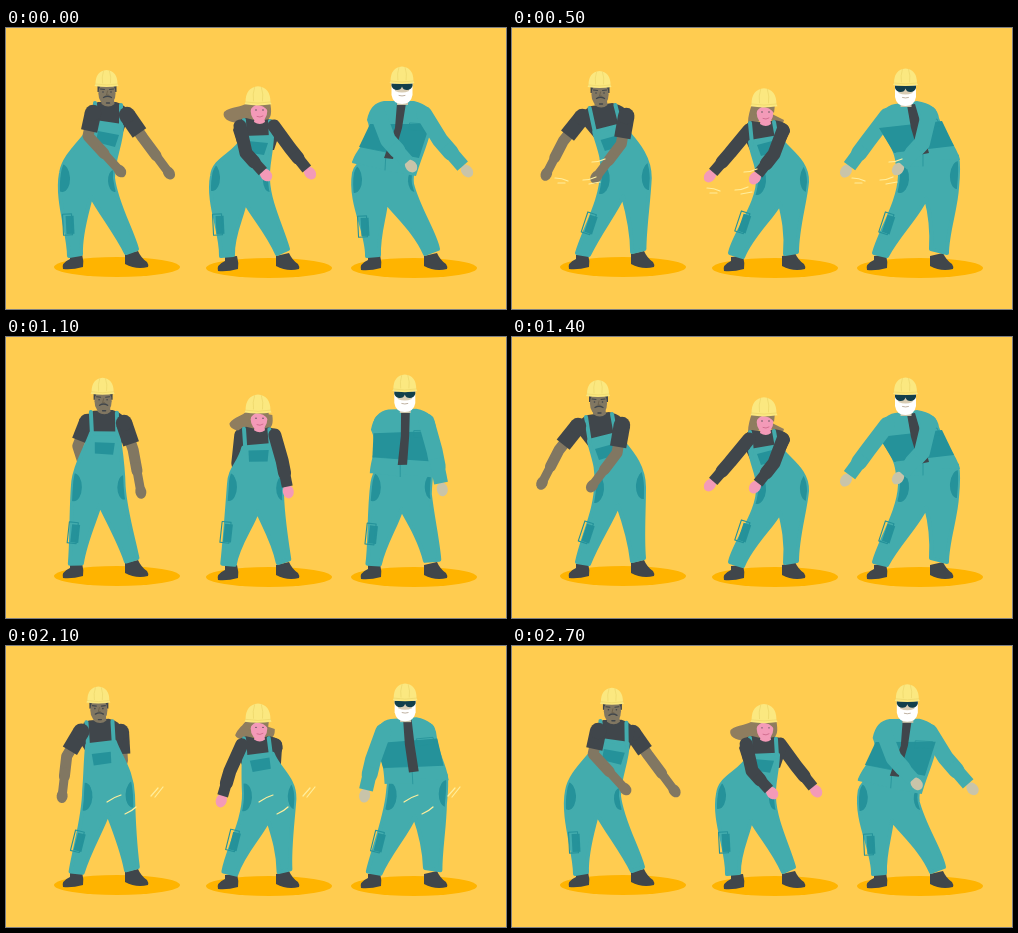
Write an HTML page with a canvas that moves like this. It is 500 by 281 pixels and loops after 2750 ms.

```html
<!DOCTYPE html>
<html lang="en">
<head>
<meta charset="utf-8">
<title>Dancing crew</title>
<style>
  html, body { margin: 0; overflow: hidden; background: #ffcc50; }
  canvas { display: block; width: 100vw; height: 100vh; }
</style>
</head>
<body>
<canvas id="stage" width="500" height="281"></canvas>
<script>
const ctx = document.getElementById('stage').getContext('2d');
const LOOP = 2750, STEP = 50, BEAT = LOOP / 6;
const TEAL = '#43acad', DEEP = '#25929a', DARK = '#40464b', HAT = '#fbe880', STREAK = '#ffee9c';

// Every shape is given twice: arms to the right, then arms to the left.
const crew = [
  {
    look: 'moustache', skin: '#817762', sleeve: DARK, short: true, width: 11, hatSize: 1, sway: 6, drag: 0,
    shadow: [111, 239], shoes: [[56, 226], [118, 225]],
    head: [[100.5, 56], [86, 57]], knee: [[62, 196], [74.5, 195]],
    pockets: [[[56, 150], [84, 152]], [[108, 153], [132, 148]]],
    legs: ['M89,94 L116,98 C115,118 107,130 107,150 C110,175 125,200 131,221 L120,225 C110,205 95,186 85,168 C82,182 74,205 75,226 L63,228 C63,205 50,172 55,145 C58,126 78,112 89,94Z',
           'M77,104 L105,97 C114,110 132,125 132,150 C132,175 130,200 132,221 L120,224 C118,205 112,185 106,168 C100,184 86,204 77,227 L65,225 C70,200 85,172 84,145 C86,130 80,118 77,104Z'],
    under: [[DARK, 'M92,74 L110,74 Q122,77 123,88 L117,104 L87,102 L79,88 Q84,77 92,74Z',
                   'M76,78 L97,75 Q112,78 115,90 L113,114 L77,110 L63,92 Q68,80 76,78Z']],
    over: [[TEAL, 'M89,75 L90,95 M115,77 L115,99', 'M74,80 L78,106 M100,77 L104,99', 4],
           [DEEP, 'M92,103 L113,107 L109,119 L90,114Z', 'M83,112 L101,107 L104,118 L87,123Z']],
    arms: [[[87, 85], [82, 108], [114, 143], [66, 89], [47, 113], [30, 146]],
           [[121, 87], [137, 110], [163, 145], [110, 88], [105, 116], [80, 149]]],
    swoosh: [0, 0]
  },
  {
    look: 'hair', skin: '#f39ab8', sleeve: DARK, width: 13, hatSize: 1.13, sway: 0, drag: 0,
    shadow: [263, 240], shoes: [[211, 228], [269, 227]],
    head: [[252, 74], [252, 76]], knee: [[212, 196], [231, 194]],
    pockets: [[[206, 149], [246, 153]], [[263, 153], [296, 150]]],
    legs: ['M237,110 L266,109 C265,128 261,138 262,152 C263,175 276,200 282,221 L271,226 C262,205 248,190 239,174 C236,190 226,208 227,227 L215,228 C216,205 201,175 206,148 C208,130 229,127 237,110Z',
           'M238,114 L267,109 C274,122 296,132 295,154 C293,175 285,200 285,224 L273,226 C275,205 271,188 268,175 C260,190 240,207 231,229 L218,225 C222,205 248,175 246,148 C245,135 240,128 238,114Z'],
    under: [['#8f7d5f', 'M242,74 C236,80 225,78 218,84 C215,92 228,98 246,93 L258,93 C266,92 266,84 264,74Z',
                        'M240,76 C238,82 236,88 236,95 C240,97 244,95 248,93 L262,92 C266,97 271,97 272,92 C271,84 266,80 262,76Z'],
            [DARK, 'M240,90 Q253,94 263,91 Q275,93 274,104 L268,122 L234,124 L227,102 Q230,91 240,90Z',
                   'M240,93 Q253,96 262,92 Q278,94 278,104 L271,118 L238,122 L230,105 Q233,94 240,93Z']],
    over: [[TEAL, 'M238,92 L239,112 M264,93 L265,111', 'M238,95 L240,116 M262,94 L265,111', 4],
           [DEEP, 'M241,113 L262,115 L258,127 L239,124Z', 'M245,117 L264,112 L267,123 L249,128Z']],
    arms: [[[234, 98], [240, 125], [260, 147], [237, 102], [218, 125], [198, 148]],
           [[268, 98], [284, 120], [304, 145], [271, 102], [262, 126], [243, 150]]],
    swoosh: [152, 10]
  },
  {
    look: 'beard', skin: '#c9c4a9', sleeve: TEAL, width: 16, hatSize: 1.04, sway: 0, drag: 5,
    shadow: [408, 240], shoes: [[354, 227], [417, 227]],
    head: [[396, 53], [393.5, 55]], knee: [[357, 198], [375, 195]],
    pockets: [[[348, 151], [389, 151]], [[408, 153], [446, 147]]],
    legs: ['M360,130 L408,138 C406,145 405,150 406,156 C412,180 429,205 432,221 L419,226 C410,205 393,190 380,174 C379,188 372,207 373,227 L361,228 C362,205 343,175 348,145 C350,138 355,134 360,130Z',
           'M388,130 L445,128 C447,138 446,150 445,160 C444,180 435,205 435,225 L419,221 C420,205 418,185 414,170 C406,188 386,207 375,228 L362,225 C367,205 387,175 388,148 C388,140 388,134 388,130Z'],
    under: [],
    over: [[TEAL, 'M378,73 L408,73 Q426,77 427,92 C423,115 417,125 410,148 L380,143 L346,135 C350,118 369,110 361,92 Q364,75 378,73Z',
                  'M383,76 L405,73 Q425,76 427,90 C432,105 445,118 448,132 L412,131 L384,140 C384,122 373,110 365,98 Q369,78 383,76Z'],
           [DEEP, 'M364,96 L424,96 L413,130 L353,119Z', 'M367,100 L430,93 L442,118 L382,125Z'],
           [TEAL, 'M355,119 L380,124 L379,142 L346,134Z', 'M384,124 L411,121 L411,138 L385,140Z'],
           [DEEP, 'M355,119 L380,124 L379,142 M404,95 L421,96 L420,103 L403,102Z', 'M384,124 L411,121 L411,138 M409,94 L425,91 L428,98 L411,101Z', 0.8],
           [DARK, 'M391,75 L400,75 L396,100 L387,131 L378,130 L389,100Z', 'M395,77 L403,76 L410,100 L417,125 L407,127 L399,100Z']],
    arms: [[[372, 86], [382, 112], [405, 138], [375, 88], [356, 113], [334, 143]],
           [[418, 86], [434, 112], [461, 143], [417, 86], [410, 115], [386, 141]]],
    swoosh: [297, 0]
  }
];

const lerp = (a, b, s) => a + (b - a) * s;
const clamp = f => Math.max(0, Math.min(1, f));
const smooth = f => f * f * (3 - 2 * f);

function paint(color, path, line) {
  const p = new Path2D(path);
  if (line) {
    ctx.strokeStyle = color; ctx.lineWidth = line; ctx.stroke(p);
  } else {
    ctx.fillStyle = color; ctx.fill(p);
  }
}

function oval(color, x, y, rx, ry, turn = 0) {
  ctx.fillStyle = color;
  ctx.beginPath();
  ctx.ellipse(x, y, rx, ry, turn, 0, 7);
  ctx.fill();
}

function at(x, y, draw, turn = 0, scale = 1) {
  ctx.save();
  ctx.translate(x, y);
  ctx.rotate(turn);
  ctx.scale(scale, scale);
  draw();
  ctx.restore();
}

// 0 = right pose, 1 = left pose. A short hold, then a move that ends at `end` of the beat.
function side(t, end) {
  const hold = .09, beat = Math.floor(t / BEAT);
  const e = smooth(clamp((t / BEAT - beat - hold) / (end - hold)));
  return beat % 2 ? 1 - e : e;
}

function drawArm(who, [s0, e0, h0, s1, e1, h1], body, swing, warp) {
  // Upper arm and forearm turn about their joints.
  const turn = (from, a0, b0, a1, b1) => {
    const angle = lerp(Math.atan2(b0[0] - a0[0], b0[1] - a0[1]), Math.atan2(b1[0] - a1[0], b1[1] - a1[1]), swing);
    const len = lerp(Math.hypot(b0[0] - a0[0], b0[1] - a0[1]), Math.hypot(b1[0] - a1[0], b1[1] - a1[1]), swing);
    return [from[0] + len * Math.sin(angle), from[1] + len * Math.cos(angle), angle];
  };
  const S = warp(lerp(s0[0], s1[0], body), lerp(s0[1], s1[1], body));
  const E = turn(S, s0, e0, s1, e1), H = turn(E, e0, h0, e1, h1);
  const on = (a, b, k) => [lerp(a[0], b[0], k), lerp(a[1], b[1], k)];
  const w = who.width;
  oval(who.skin, H[0], H[1], 5.5, 7, -H[2]);
  if (who.short) {
    paint(who.skin, `M${S} L${on(S, E, 1)} L${on(E, H, .5)}`, w);
    paint(who.skin, `M${on(E, H, .4)} L${on(E, H, 1)}`, w - 2);
    ctx.lineCap = 'butt';
    paint(who.sleeve, `M${S} L${on(S, E, .78)}`, 16.5);
    ctx.lineCap = 'round';
    oval(who.sleeve, S[0], S[1], 8.2, 8.2);
  } else {
    paint(who.sleeve, `M${S} L${on(S, E, 1)} L${on(E, H, .4)}`, w);
    ctx.lineCap = 'butt';
    paint(who.sleeve, `M${on(E, H, .2)} L${on(E, H, .84)}`, w - 2);
    ctx.lineCap = 'round';
  }
}

function drawHat() {
  paint(HAT, 'M-11,0 Q-11,-13 0,-14 Q11,-13 11,0 L12,2 Q0,4 -12,2Z');
  paint('#ead468', 'M-11,0 Q0,2 11,0 M-3,-13 Q-5,-7 -4,-1 M3,-13 Q5,-7 4,-1', .6);
}

function drawHead(who) {
  if (who.look === 'moustache') {
    paint(who.skin, 'M-4,12 L7,12 L8,20 Q2,25 -5,20Z');
    paint(DARK, 'M-9,0 H10 V8 H-9Z');
    oval(who.skin, .5, 9.5, 8.6, 12);
    paint(DARK, 'M-6,5 L-2,5.5 M3,5.5 L7,5', 1.1);
    paint(DARK, 'M-3,13.5 Q1,11 5,13.5 M0,19 L3,19', 1.4);
    oval(DARK, -3.5, 8, .8, .8);
    oval(DARK, 4.5, 8, .8, .8);
    paint('#655a46', 'M1,7 L0,11 L2,11', .7);
  } else if (who.look === 'hair') {
    paint(who.skin, 'M-3,14 L6,14 L7,20 Q2,24 -4,20Z');
    oval(who.skin, 1, 9, 8.3, 11);
    paint('#8f7d5f', 'M-10,0 H11 L10,9 Q6,3 -2,3 Q-7,5 -9,11Z');
    oval(DARK, -2, 8, .7, .7);
    oval(DARK, 5, 8, .7, .7);
    paint('#cf6a8c', 'M-1,14.5 Q2,16 5,14', .9);
  } else {
    paint(who.skin, 'M-5,14 H6 V24 H-5Z');
    paint('#fff', 'M-10.5,0 H10.5 V14 Q9,23 0,23 Q-9,23 -10.5,14Z');
    paint('#d9cdb4', 'M-7,2 H7 V10 Q0,13 -7,10Z');
    paint('#123f4b', 'M-10.5,2.5 H10.5 V5 Q9,9 5,9 Q1,9 0,5.5 Q-1,9 -5,9 Q-9,9 -10.5,5Z');
    paint('#b8aa98', 'M-3,14.5 Q0,15.5 3,14.5', .9);
  }
  at(0, 0, drawHat, 0, who.hatSize);
}

function drawWorker(who, t) {
  // Hips lead, arms follow, the head comes last.
  const hips = side(t, .78), swing = side(t, .86), body = side(t, 1);
  const beat = Math.floor(t / BEAT), middle = Math.sin(Math.PI * body);
  const sway = who.sway * Math.exp(-(((t - 500) / 150) ** 2));
  const warp = (x, y) => {
    const high = clamp(1 - (y - 40) / 180);
    return [
      x + sway * Math.sin(Math.PI * clamp((y - 42) / 183)) + (beat % 2 ? -1 : 1) * who.drag * middle * high,
      y - 2.2 * middle * high
    ];
  };
  const blend = (x0, y0, x1, y1) => {
    const s = lerp(body, hips, clamp((lerp(y0, y1, .5) - 75) / 60));
    return warp(lerp(x0, x1, s), lerp(y0, y1, s));
  };
  const mid = ([a, b]) => blend(...a, ...b);
  const pair = /([\d.]+),([\d.]+)/g;
  const morph = (from, to) => {
    const ends = [...to.matchAll(pair)];
    let i = 0;
    return from.replace(pair, (_, x, y) => {
      const end = ends[i++];
      return blend(+x, +y, +end[1], +end[2]).join();
    });
  };
  const parts = list => list.forEach(([color, a, b, line]) => paint(color, morph(a, b), line));
  const behind = [beat === 1 || beat === 2, beat >= 4];
  const arms = back => who.arms.forEach((arm, i) => {
    if (behind[i] === back) drawArm(who, arm, body, swing, warp);
  });

  const [left, right] = who.shoes;
  at(...left, () => paint(DARK, 'M8,1 L20,0 Q22,7 21,13 Q10,16 1,15 Q-1,9 8,5Z'));
  at(...right, () => paint(DARK, 'M1,1 L14,-2 Q17,5 23,9 Q25,12 24,14 Q12,17 1,11Z'));
  arms(true);
  parts(who.under);

  const legs = morph(...who.legs);
  paint(TEAL, legs);
  paint(TEAL, legs, 4);
  ctx.save();
  ctx.clip(new Path2D(legs));
  who.pockets.forEach((pocket, i) => {
    const [x, y] = mid(pocket);
    oval(DEEP, x, y, i ? lerp(6, 8, hips) : 8, i ? lerp(11, 14, hips) : 14, lerp(-.05, .08, hips));
  });
  ctx.restore();
  const [kx, ky] = mid(who.knee);
  at(kx, ky, () => {
    paint(DEEP, 'M-2,-8 H6 V10 H-2Z');
    paint(DEEP, 'M-5,-10 H4 V11 H-5Z', 1.1);
  }, lerp(-.05, .32, hips));

  const [hx, hy] = mid(who.head);
  if (who.look !== 'beard') at(hx, hy, () => drawHead(who));
  parts(who.over);
  if (who.look === 'beard') at(hx, hy, () => drawHead(who));
  arms(false);

  at(...who.swoosh, () => {
    if (t >= 450 && t < 600)
      paint(STREAK, 'M43,150 Q50,150 56,153 M46,155 L53,155 M71,152 Q78,152 84,149 M77,156 L88,154 M80,134 Q87,134 93,131', 1.2);
  });
  at(who.swoosh[0], 0, () => {
    if (t >= 2050 && t < 2200)
      paint(STREAK, 'M101,156 Q108,151 115,149 M119,168 Q126,165 130,161 M145,150 L152,142 M149,151 L157,141', 1.2);
  });
}

function frame(now) {
  const t = Math.floor(now % LOOP / STEP) * STEP;
  ctx.fillStyle = '#ffcc50';
  ctx.fillRect(0, 0, 500, 281);
  ctx.lineCap = ctx.lineJoin = 'round';
  crew.forEach(who => oval('#ffb400', ...who.shadow, 63, 10));
  crew.forEach(who => drawWorker(who, t));
  requestAnimationFrame(frame);
}
requestAnimationFrame(frame);
</script>
</body>
</html>
```
